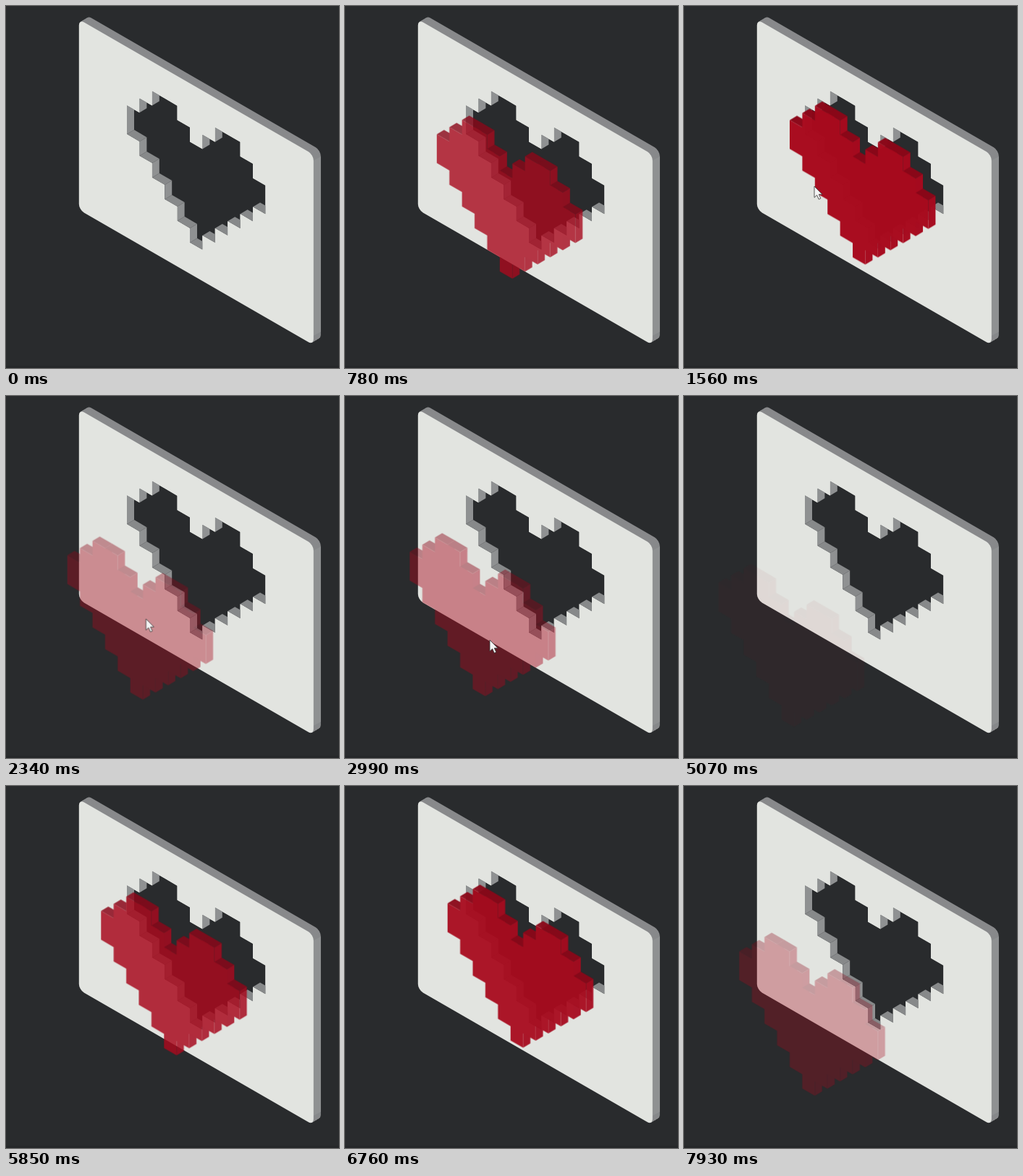
An HTML page for the animation above (8 s loop, 460 by 500 pixels).

```html
<!DOCTYPE html>
<html lang="en">
<head>
<meta charset="utf-8">
<title>Pixel heart</title>
<style>
  html, body { margin: 0; width: 100%; height: 100%; overflow: hidden; background: #292b2d; }
  svg { display: block; width: 460px; height: 500px; }
</style>
</head>
<body>
<svg id="stage" viewBox="0 0 460 500"></svg>
<script>
const LOOP = 8000, STEP = 130;
const SLOPE = 0.577;              // isometric fall per pixel to the right
const DEPTH = [10, -6];           // extrusion towards the back
const CELL = { w: 17.4, h: 19.9 };
const ORIGIN = [167, 97.5];       // heart grid, top left
const TOPS = [2, 1, 0, 0, 1, 2, 1, 0, 0, 1, 2];
const BOTTOMS = [4, 5, 6, 7, 8, 9, 8, 7, 6, 5, 4];
const BACKGROUND = '#292b2d', PANEL = '#e2e4e0';

const stage = document.getElementById('stage');

function add(parent, tag, attrs = {}) {
  const node = document.createElementNS('http://www.w3.org/2000/svg', tag);
  for (const key in attrs) node.setAttribute(key, attrs[key]);
  return parent.appendChild(node);
}

// Grid corner to stage position
const point = (col, row) => [
  ORIGIN[0] + col * CELL.w,
  ORIGIN[1] + row * CELL.h + col * CELL.w * SLOPE
];
const pushBack = ([x, y]) => [x + DEPTH[0], y + DEPTH[1]];
const polygon = (parent, points, fill) =>
  add(parent, 'polygon', { points: points.map(p => p.map(n => n.toFixed(2))).join(' '), fill });

// Side wall swept from the edge a-b towards the back
const wall = (parent, a, b, fill) =>
  polygon(parent, [a, b, pushBack(b), pushBack(a)], fill);

const outline = [
  ...TOPS.flatMap((row, i) => [point(i, row), point(i + 1, row)]),
  ...BOTTOMS.flatMap((row, i) => [point(i, row), point(i + 1, row)]).reverse()
];

function drawPanel() {
  const slab = (x, y, fill) => add(stage, 'rect', {
    width: 324, height: 263, rx: 7, ry: 8, fill,
    transform: `matrix(1 ${SLOPE} 0 1 ${100.8 + x} ${18.4 + y})`
  });
  for (let k = 20; k > 0; k--) slab(DEPTH[0] * k / 20, DEPTH[1] * k / 20, '#88898b');
  polygon(stage, [[424, 214], [434.8, 208], [434.8, 450], [424, 456]], '#8f9192');
  slab(0, 0, PANEL);
}

function drawHole() {
  const clip = add(add(stage, 'defs'), 'clipPath', { id: 'hole' });
  polygon(clip, outline, '#000');
  const hole = add(stage, 'g', { 'clip-path': 'url(#hole)' });
  polygon(hole, outline, BACKGROUND);
  BOTTOMS.forEach((bottom, i) => {
    const side = (from, to) => from < to && wall(hole, point(i, from), point(i, to), '#8f9192');
    wall(hole, point(i, bottom), point(i + 1, bottom), '#87898a');
    if (i === 0) return side(TOPS[0], bottom);
    side(TOPS[i], TOPS[i - 1]);
    side(BOTTOMS[i - 1], bottom);
  });
}

function drawHeart() {
  const heart = add(stage, 'g');
  TOPS.forEach((row, i) => {
    wall(heart, point(i, row), point(i + 1, row), '#8b0819');
    wall(heart, point(i + 1, row), point(i + 1, BOTTOMS[i]), '#a60b1f');
  });
  polygon(heart, outline, '#a80b1e');
  return heart;
}

function drawCursor() {
  return add(stage, 'path', {
    d: 'M0 0V15.5L3.6 12.2L6.2 18L8.8 16.8L6.3 11.2H11Z',
    fill: '#f4f4f4', stroke: '#333', 'stroke-width': 0.8
  });
}

drawPanel();
drawHole();
add(stage, 'rect', { y: 497, width: 460, height: 3, fill: '#252729' });

const animations = [
  drawHeart().animate([
    { transform: 'translate(-125px, 126px)', opacity: 0 },
    { transform: 'translate(-20px, 19.3px)', opacity: 1 }
  ], { duration: 1252.5, delay: 147, easing: 'ease', direction: 'alternate', iterations: Infinity, fill: 'both' })
];

const cursor = drawCursor();
const cursorSteps = [
  [0, 180, 249, 0], [1300, 180, 249, 1], [1950, 180, 249, 1],
  [2600, 200, 337, 1], [4420, 200, 337, 0], [LOOP, 200, 337, 0]
];
animations.push(
  cursor.animate(cursorSteps.map(([time, x, y]) => ({
    offset: time / LOOP, transform: `translate(${x}px, ${y}px)`, easing: 'ease-in-out'
  })), { duration: LOOP, fill: 'both' }),
  cursor.animate(cursorSteps.map(([time, , , opacity]) => ({
    offset: time / LOOP, opacity, easing: 'step-end'
  })), { duration: LOOP, fill: 'both' })
);
animations.forEach(a => a.pause());

function render() {
  const tick = Math.floor(performance.now() % LOOP / STEP);
  animations.forEach(a => { a.currentTime = tick * STEP; });
  requestAnimationFrame(render);
}
render();
</script>
</body>
</html>
```
